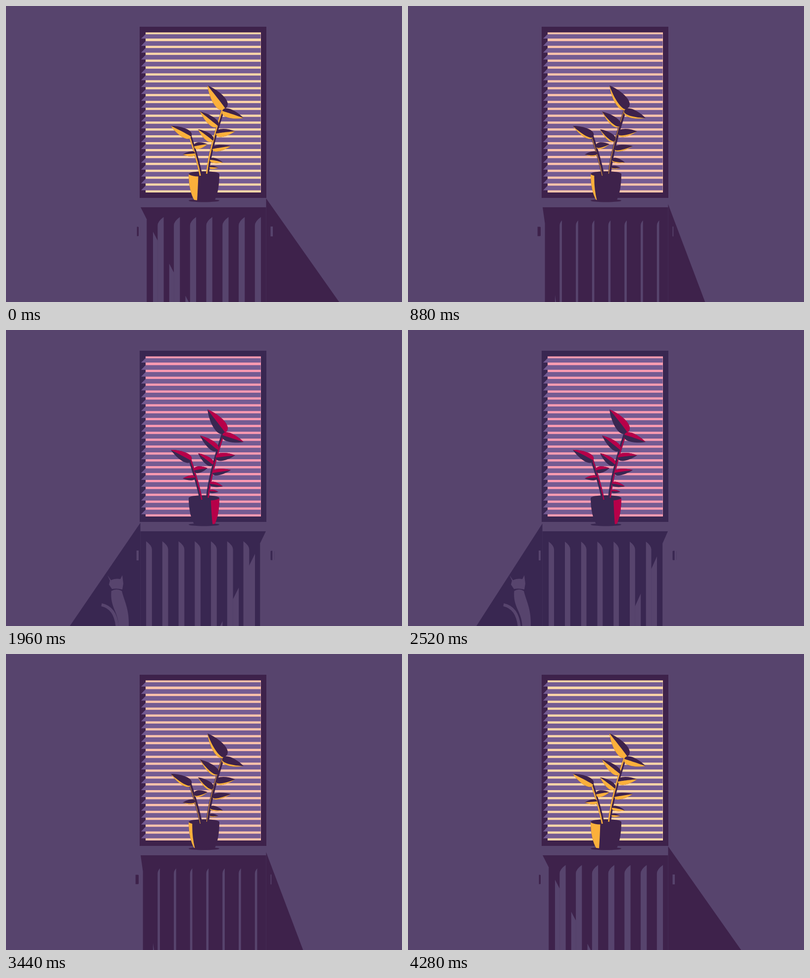
Recreate the animation shown at these times as an HTML page with a canvas. Size 800x600 px, loop 4.32 s.

```html
<!DOCTYPE html>
<html lang="en">
<head>
<meta charset="utf-8">
<title>Window light</title>
<style>
html, body { margin: 0; height: 100%; overflow: hidden; background: #57446d; }
canvas { display: block; }
</style>
</head>
<body>
<canvas id="stage" width="800" height="600"></canvas>
<script>
const c = document.getElementById('stage').getContext('2d');
const WALL = '#57446d', SLAT = '#745b92', ORANGE = '#fbb03b', RED = '#b70049';
const LOOP = 4320, STEP = 40;
let dark;

// tip x, tip y, base x, base y, upper bulge, lower bulge
const leaves = [
  [407, 161, 443, 208, 20, 20],
  [480, 227, 437, 213, 14, 14],
  [392, 214, 428, 243, 13, 14],
  [463, 254, 424, 259, 13, 12],
  [388, 250, 418, 273, 12, 12],
  [454, 284, 417, 290, 10, 10],
  [438, 317, 412, 312, 9, 7],
  [429, 328, 411, 327, 6, 5],
  [333, 243, 374, 265, 15, 14],
  [407, 280, 380, 285, 11, 10],
  [357, 301, 382, 299, 8, 8]
];
const stems = ['M407 340Q412 290 440 206', 'M394 344Q388 312 371 261'].map(d => new Path2D(d));
const pot = new Path2D('M369 340C369 365 374 383 380 393Q400 396 422 393C428 380 431 362 431 340Z');
const catHead = new Path2D('M205 497L212 507Q221 503 231 505L235 497L237 514L235 526Q224 523 214 525L208 516L210 508Z');
const catTail = new Path2D('M193 557Q222 563 225 604');

const clamp = x => Math.max(0, Math.min(1, x));
const mix = (a, b, k) => `rgb(${a.map((v, i) => Math.round(v + (b[i] - v) * k))})`;

function fill(color, path) {
  c.fillStyle = color;
  path ? c.fill(path) : c.fill();
}

function rect(color, x, y, w, h) {
  c.fillStyle = color;
  c.fillRect(x, y, w, h);
}

function poly(color, ...p) {
  c.beginPath();
  for (let i = 0; i < p.length; i += 2) c.lineTo(p[i], p[i + 1]);
  c.closePath();
  if (color) fill(color);
}

function mirrored(flip, draw) {
  c.save();
  if (flip) c.transform(-1, 0, 0, 1, 797, 0);
  draw();
  c.restore();
}

function windowBlinds(stripe) {
  rect(dark, 270, 42, 256, 347);
  rect(stripe, 282, 53.5, 233, 324.5);
  for (let i = 0; i < 23; i++) {
    const y = 57.3 + i * 13.95, h = i ? 9.4 : 8.7;
    rect(SLAT, 282, y, 232.5, h);
    poly(SLAT, 282, y, 282, y + h, 273, y + h);
  }
}

const wallShadow = (color, reach) =>
  poly(color, 525.5, 413.5 - .16 * reach, 526 + reach, 600, 525.5, 600);

// Lit faces and gaps of the radiator, with the light coming from the left
function litRibs(reach, w, flip) {
  if (w <= 0) return;
  const slope = Math.max(.001, .005 * (reach - 46)), shift = flip ? 3 : 0;
  const gap = 297 - shift, face = 306.3 - shift + (flip ? .2 * w : 0);
  const lineY = x => 408 + (x - 272) / slope;
  poly(WALL, 271, 408, 272, 408, 272 + w, lineY(272 + w), 272 + w, 1e6, 271, 1e6);
  for (let i = 0; i < 7; i++) {
    const x = face + i * 32.75, g = gap + i * 32.75;
    const top = 445 - 17 * Math.sqrt(w / 12);
    c.beginPath();
    c.moveTo(x, 445);
    c.quadraticCurveTo(x, (445 + top) / 2, x + w, top);
    c.lineTo(x + w, 600);
    c.lineTo(x, 600);
    fill(WALL);
    poly(WALL, g, lineY(g), x + .3, lineY(x), x + .3, 1e6, g, 1e6);
  }
}

function handles(wl, wr) {
  const a = .37 * wl, b = .37 * wr;
  for (const x of [260, 534.5]) {
    c.beginPath();
    c.roundRect(x, 447.5, 8, 19, 1.5);
    fill(dark);
    rect(WALL, x, 447, a, 20);
    rect(WALL, x + 8 - b, 447, b, 20);
  }
}

function cat(reach, f) {
  c.save();
  c.beginPath();
  mirrored(true, () => wallShadow(null, reach));
  c.clip();
  fill(WALL, catHead);
  const x = 234 - 22 * f, end = 248 - 22 * f * f;
  c.beginPath();
  c.moveTo(x, 529);
  c.quadraticCurveTo((x + 234) / 2, 523, 234, 529);
  c.bezierCurveTo(239, 550, 249, 565, 248, 600);
  c.lineTo(end, 600);
  c.bezierCurveTo(end - 1, 570, x - 3, 562, x, 529);
  fill(WALL);
  c.strokeStyle = WALL;
  c.lineWidth = 1.5 + 5 * f;
  c.stroke(catTail);
  c.restore();
}

function leaf([ax, ay, bx, by, up, low], f, red) {
  const dx = bx - ax, dy = by - ay, s = Math.sign(dx) / Math.hypot(dx, dy);
  const nx = dy * s, ny = -dx * s;
  const at = (k, h) => [ax + dx * k + nx * h, ay + dy * k + ny * h];
  const shape = (h1, h2, color) => {
    c.beginPath();
    c.moveTo(ax, ay);
    c.bezierCurveTo(...at(.4, .7 * h1), ...at(1.02, h1), bx, by);
    c.bezierCurveTo(...at(1.02, h2), ...at(.4, .7 * h2), ax, ay);
    fill(color);
  };
  shape(up, -low, dark);
  const edge = red ? up : -low, far = red ? -low : up;
  if (f > 0) shape(edge, edge + (far - edge) * .52 * f, red ? RED : ORANGE);
}

function plant(f, red) {
  const lit = red ? RED : ORANGE;
  c.beginPath();
  c.ellipse(400, 394.5, 31, 3, 0, 0, 7);
  fill(dark);
  fill(dark, pot);
  if (f > 0) {
    c.save();
    c.clip(pot);
    const x = red ? 431 - 18 * f : 369 + 19.5 * f;
    const end = red ? 424 - 7 * f : 379 + 7 * f;
    const side = red ? 440 : 360;
    c.beginPath();
    c.moveTo(side, 340);
    c.lineTo(x, 340);
    c.quadraticCurveTo(x + (red ? 1 : -1), 370, end, 394);
    c.lineTo(side, 394);
    fill(lit);
    c.restore();
  }
  c.beginPath();
  c.ellipse(400, 340.5, 31, 5.5, 0, 0, 7);
  fill(dark);
  for (const stem of stems) {
    c.lineWidth = 6;
    c.strokeStyle = dark;
    c.stroke(stem);
    if (f > .1) {
      c.save();
      c.translate(red ? 1.6 : -1.6, 0);
      c.lineWidth = 2.6 * f;
      c.strokeStyle = lit;
      c.stroke(stem);
      c.restore();
    }
  }
  for (const l of leaves) leaf(l, f, red);
}

function draw(now) {
  const time = Math.floor(now % LOOP / STEP) * STEP;
  const t = Math.min(time, LOOP - time);
  const red = t >= 1120;
  // How far each wall shadow reaches at the floor
  const dropR = 89 * (t / 960) ** 2.3, dropL = 84 * ((2160 - t) / 880) ** 2.07;
  const right = 147 - dropR, left = 146 - dropL;
  const width = reach => Math.max(0, (reach - 30) * .105);
  const wl = red ? 0 : width(right), wr = red ? width(left) : 0;
  const f = (wl + wr) / 12.2;
  const hue = clamp(red ? 1 - dropL / 240 : dropR / 240);

  dark = mix([62, 34, 75], [57, 39, 81], clamp((t - 880) / 400));
  rect(WALL, 0, 0, 800, 600);
  windowBlinds(mix([255, 214, 168], [255, 153, 177], hue));

  rect(dark, 271.5, 408, 254, 192);
  if (wl) mirrored(false, () => litRibs(right, wl, false));
  if (wr) mirrored(true, () => litRibs(left, wr, true));
  if (right > 0) wallShadow(dark, right);
  if (left > 0) {
    mirrored(true, () => wallShadow(dark, left));
    cat(left, f);
  }
  handles(wl, wr);
  plant(f, red);
}

const start = performance.now();
function tick() {
  draw(performance.now() - start);
  requestAnimationFrame(tick);
}
tick();
</script>
</body>
</html>
```
